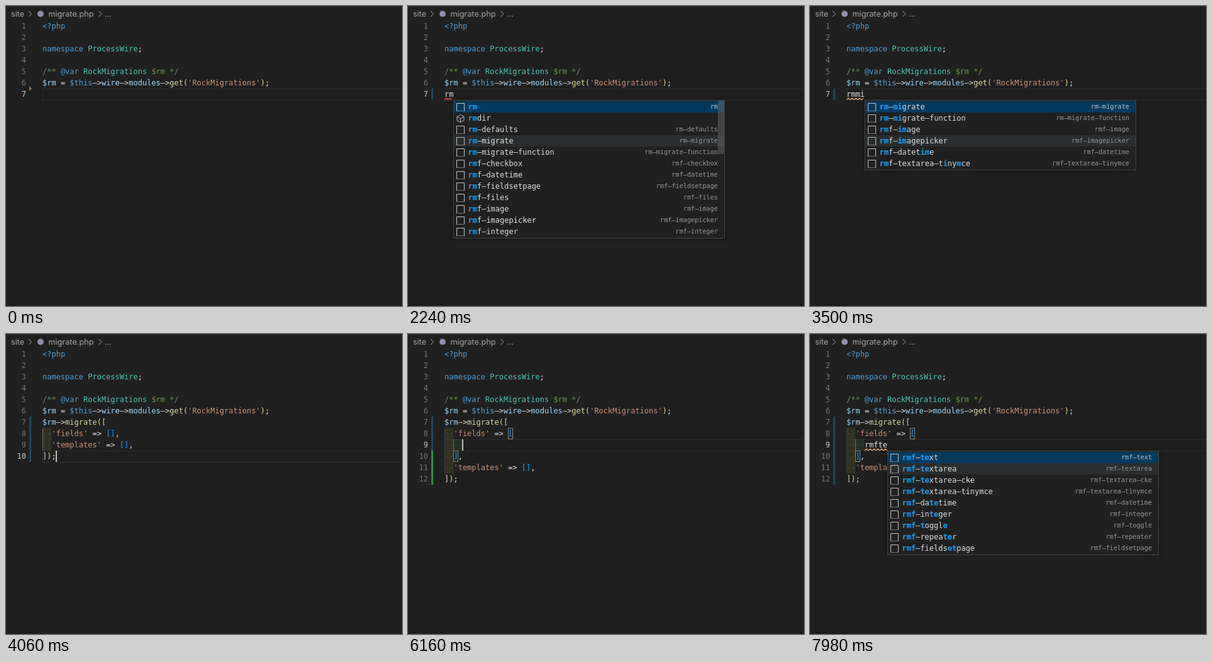
An HTML page with a canvas that plays this animation: 630x476 px, repeating every 8 s.

```html
<!DOCTYPE html>
<html lang="en">
<head>
<meta charset="utf-8">
<title>Editor autocomplete</title>
<style>
  html, body { margin: 0; width: 100%; height: 100%; overflow: hidden; background: #1f1f1f; }
  canvas { display: block; }
</style>
</head>
<body>
<canvas id="stage" width="630" height="476"></canvas>
<script>
const ctx = document.getElementById('stage').getContext('2d');
const LOOP = 8000, LEFT = 58, TOP = 23, ROW = 18, CHAR = 7.224;
const MONO = '"DejaVu Sans Mono", monospace';

const COLORS = {
  k: '#50a2da', t: '#4ec9b0', c: '#6a9955', v: '#9cdcfe', f: '#dcdcaa',
  s: '#ce9178', p: '#e2e2e2', y: '#eed894', m: '#d8d4d8', b: '#179fff'
};

// Each piece is a colour key followed by its text; pieces are split by "|".
const HEAD = [
  'k<?php', '', 'knamespace |tProcessWire|p;', '',
  'c/** |k@var |tRockMigrations|c $rm */',
  "v$rm|p = |k$this|p->|vwire|p->|vmodules|p->|fget|y(|s'RockMigrations'|y)|p;"
];
const CALL = 'v$rm|p->|fmigrate|y(|m[';
const TEMPLATES = "s  'templates'|p => |b[]|p,";
const END = 'm]|y)|p;';
const BODIES = {
  typing: s => ['p' + s.typed],
  snippet: () => [CALL, "s  'fields'|p => |b[]|p,", TEMPLATES, END],
  opened: s => [CALL, "s  'fields'|p => |b[", 'p    ' + s.typed, 'b  ]|p,', TEMPLATES, END]
};

const prefixed = (prefix, names) => names.split(' ').map(n => prefix + n);
const FIELDS = prefixed('rmf-', 'checkbox datetime fieldsetpage files image imagepicker integer options page repeater rockpagebuilder text');
const LISTS = {
  rm: ['rm', 'rmdir', 'rm-defaults', 'rm-migrate', 'rm-migrate-function', ...FIELDS.slice(0, 7)],
  migrate: ['rm-migrate', 'rm-migrate-function', ...prefixed('rmf-', 'image imagepicker datetime textarea-tinymce')],
  fields: FIELDS,
  text: prefixed('rmf-', 'text textarea textarea-cke textarea-tinymce datetime integer toggle repeater fieldsetpage')
};

const OUTER = [[7, 13], [10, 0]], PAIR = [[8, 14], [8, 15]], OPEN = [[8, 14], [10, 2]];
const RED = '#f14c4c', ORANGE = '#e6ab80';

// Every step changes only the listed properties.
const STEPS = [
  [0, { body: 'typing', typed: '', row: 7, col: 0, caret: false, blue: 6, green: 6,
        list: null, prefix: 2, thumb: 0, wave: null, match: [] }],
  [420, { caret: true }],
  [840, { caret: false }],
  [1260, { caret: true }],
  [1540, { typed: 'r', col: 1 }],
  [1680, { typed: 'rm', col: 2 }],
  [1820, { list: 'rm', thumb: 85 }],
  [1960, { blue: 7, green: 7, wave: RED }],
  [2240, { caret: false }],
  [2660, { typed: 'rmm', col: 3, caret: true, list: 'migrate', thumb: 0 }],
  [2800, { typed: 'rmmi', col: 4 }],
  [3220, { caret: false }],
  [3500, { wave: ORANGE }],
  [3640, { body: 'snippet', typed: '', row: 10, col: 3, caret: true, list: null, wave: null, green: 10 }],
  [4060, { blue: 10 }],
  [4200, { caret: false }],
  [4760, { row: 9, caret: true, match: OUTER }],
  [4900, { row: 8 }],
  [5320, { col: 17 }],
  [5460, { col: 16, match: PAIR }],
  [5600, { col: 15 }],
  [6020, { body: 'opened', row: 9, col: 4, match: OPEN }],
  [6160, { blue: 9, green: 12 }],
  [6580, { typed: 'r', col: 5 }],
  [6720, { typed: 'rm', col: 6 }],
  [6860, { typed: 'rmf', col: 7, list: 'fields', prefix: 3, thumb: 138 }],
  [7000, { typed: 'rmft', col: 8, list: 'text', thumb: 0 }],
  [7140, { typed: 'rmfte', col: 9 }],
  [7700, { caret: false, blue: 12 }],
  [7980, { wave: ORANGE }]
];

const stateAt = time => Object.assign({}, ...STEPS.filter(s => s[0] <= time).map(s => s[1]));
const rowTop = row => TOP + (row - 1) * ROW;
const colX = col => LEFT + col * CHAR;

function rect(x, y, w, h, color) {
  ctx.fillStyle = color;
  ctx.fillRect(x, y, w, h);
}

function frame(x, y, w, h, color) {
  ctx.strokeStyle = color;
  ctx.lineWidth = 1;
  ctx.strokeRect(x + .5, y + .5, w - 1, h - 1);
}

function line(points, color, width = 1) {
  ctx.strokeStyle = color;
  ctx.lineWidth = width;
  ctx.beginPath();
  points.forEach(([x, y]) => ctx.lineTo(x, y));
  ctx.stroke();
}

function text(str, x, y, color, font, align = 'left') {
  ctx.font = font;
  ctx.textAlign = align;
  ctx.fillStyle = color;
  ctx.fillText(str, x, y);
}

// Code uses the wide hyphen of the editor font.
function code(str, x, y, color, font = '12px', align) {
  text(String(str).replaceAll('-', '\u2013'), x, y, color, font + ' ' + MONO, align);
}

function drawBreadcrumb() {
  const font = '12.7px Inter, sans-serif', gray = '#a9a9a9';
  rect(0, 0, 630, 1, '#2b2b2b');
  text('site', 8, 17, gray, font);
  text('migrate.php', 67.5, 17, gray, font);
  text('...', 157, 17, gray, font);
  for (const x of [36, 147.5]) line([[x, 8], [x + 4.5, 12.5], [x, 17]], gray);
  ctx.fillStyle = '#918bb0';
  ctx.beginPath();
  ctx.arc(55, 12.5, 5, 0, 7);
  ctx.fill();
}

function drawGutter(s, count) {
  for (let row = 1; row <= count; row++) {
    code(row, 32, rowTop(row) + 13, row === s.row ? '#cccccc' : '#6e7681', '12px', 'right');
  }
  if (s.blue < 7) {
    ctx.fillStyle = '#96704f';
    ctx.beginPath();
    ctx.moveTo(37, 127);
    ctx.lineTo(41, 131);
    ctx.lineTo(37, 135);
    ctx.fill();
    return;
  }
  const top = rowTop(7), bottom = rowTop(s.blue + 1);
  ctx.save();
  ctx.beginPath();
  ctx.rect(37, top, 3, bottom - top);
  ctx.clip();
  for (let y = top; y < bottom + 4; y += 3) line([[36, y + 1], [41, y - 4]], '#2b94cc', 1);
  ctx.restore();
  rect(37, bottom, 3, (s.green - s.blue) * ROW, '#2b8f4e');
}

function drawIndent(row, spaces, active) {
  const y = rowTop(row);
  const tints = ['rgba(255,255,64,.08)', 'rgba(127,255,127,.07)'];
  for (let i = 0; i < spaces / 2; i++) {
    rect(Math.round(colX(i * 2)), y, 14.4, ROW, tints[i]);
    rect(Math.round(colX(i * 2)), y, 1, ROW, i === active ? '#707070' : '#404040');
  }
  for (let i = 0; i < spaces; i++) rect(colX(i + .5) - .7, y + 8.5, 1.5, 1.5, '#505047');
}

function drawCode(s, lines) {
  frame(LEFT, rowTop(s.row), 580, ROW + 1, '#2b2b2b');
  lines.forEach((source, i) => {
    const row = i + 1, pieces = source.split('|').filter(Boolean);
    const spaces = pieces.map(p => p.slice(1)).join('').match(/^ */)[0].length;
    drawIndent(row, spaces, s.body === 'opened' ? 1 : 0);
    let col = 0;
    for (const piece of pieces) {
      code(piece.slice(1), colX(col), rowTop(row) + 13, COLORS[piece[0]]);
      col += piece.length - 1;
    }
  });
  for (const [row, col] of s.match) frame(Math.round(colX(col)), rowTop(row), 8, ROW, '#888888');
  if (s.wave) drawWave(colX(s.col - s.typed.length), colX(s.col), rowTop(s.row) + 16.5, s.wave);
  if (s.caret) rect(Math.round(colX(s.col)) - 1, rowTop(s.row), 2, ROW, '#c4c4c0');
}

function drawWave(from, to, y, color) {
  const points = [];
  for (let x = from, up = false; x <= to; x += 3, up = !up) points.push([x, y + (up ? -1.2 : 1.2)]);
  line(points, color, 1.1);
}

// Indexes of the letters in a label that match what has been typed.
function matched(label, typed, prefix) {
  const hits = new Set([...Array(prefix).keys()]);
  const [a, b] = typed.slice(prefix);
  if (!a) return hits;
  const rest = label.slice(prefix);
  const patterns = b ? [a + b, b + a, a + '.*?' + b, b + '.*?' + a] : [a];
  for (const pattern of patterns) {
    const found = rest.match(new RegExp(pattern));
    if (!found) continue;
    const start = prefix + found.index;
    hits.add(start).add(start + found[0].length - 1);
    break;
  }
  return hits;
}

function drawSnippetIcon(x, y) {
  line([[x + .5, y + 12], [x + .5, y + .5], [x + 12.5, y + .5], [x + 12.5, y + 12]], '#c8c8c8');
  for (let i = 0; i < 13; i += 2) rect(x + i, y + 12, 1, 1, '#c8c8c8');
}

function drawCubeIcon(x, y) {
  const color = '#c4bccb', mid = [x + 6.5, y + 6.5];
  line([[x + 6.5, y + .5], [x + 12, y + 3.5], [x + 12, y + 9.5], [x + 6.5, y + 12.5],
        [x + 1, y + 9.5], [x + 1, y + 3.5], [x + 6.5, y + .5]], color);
  line([[x + 1, y + 3.5], mid, [x + 12, y + 3.5]], color);
  line([mid, [x + 6.5, y + 12.5]], color);
}

function drawPopup(s) {
  const items = LISTS[s.list], x = Math.round(colX(s.col)), y = rowTop(s.row + 1);
  const width = 432, height = items.length * ROW + 4;
  ctx.shadowColor = 'rgba(0,0,0,.36)';
  ctx.shadowBlur = 8;
  rect(x, y, width, height, '#202020');
  ctx.shadowBlur = 0;
  items.forEach((label, i) => {
    const top = y + 2 + i * ROW, pointed = top < 213 && top + ROW > 213;
    if (i === 0) rect(x + 1, top, width - 2, ROW, '#04395e');
    else if (pointed) rect(x + 1, top, width - 2, ROW, '#2a2d2e');
    const plain = label === 'rmdir';
    (plain ? drawCubeIcon : drawSnippetIcon)(x + 5, top + 3);
    const hits = matched(label, s.typed, s.prefix);
    [...label].forEach((ch, n) => {
      const hit = hits.has(n);
      code(ch, x + 23.5 + n * CHAR, top + 13, hit ? '#10a2ff' : '#e0e0e0', hit ? 'bold 12px' : '12px');
    });
    if (!plain) code(label, x + 421, top + 11.5, i ? '#989898' : '#b8c3cb', '10.2px', 'right');
  });
  if (s.thumb) rect(x + width - 11, y + 1, 10, s.thumb, 'rgba(121,121,121,.4)');
  frame(x, y, width, height, '#454545');
}

function draw(now) {
  const s = stateAt(now % LOOP);
  const lines = [...HEAD, ...BODIES[s.body](s)];
  rect(0, 0, 630, 476, '#1f1f1f');
  drawBreadcrumb();
  drawGutter(s, lines.length);
  drawCode(s, lines);
  if (s.list) drawPopup(s);
}

const start = performance.now();
function tick() {
  draw(performance.now() - start);
  requestAnimationFrame(tick);
}
tick();
</script>
</body>
</html>
```
